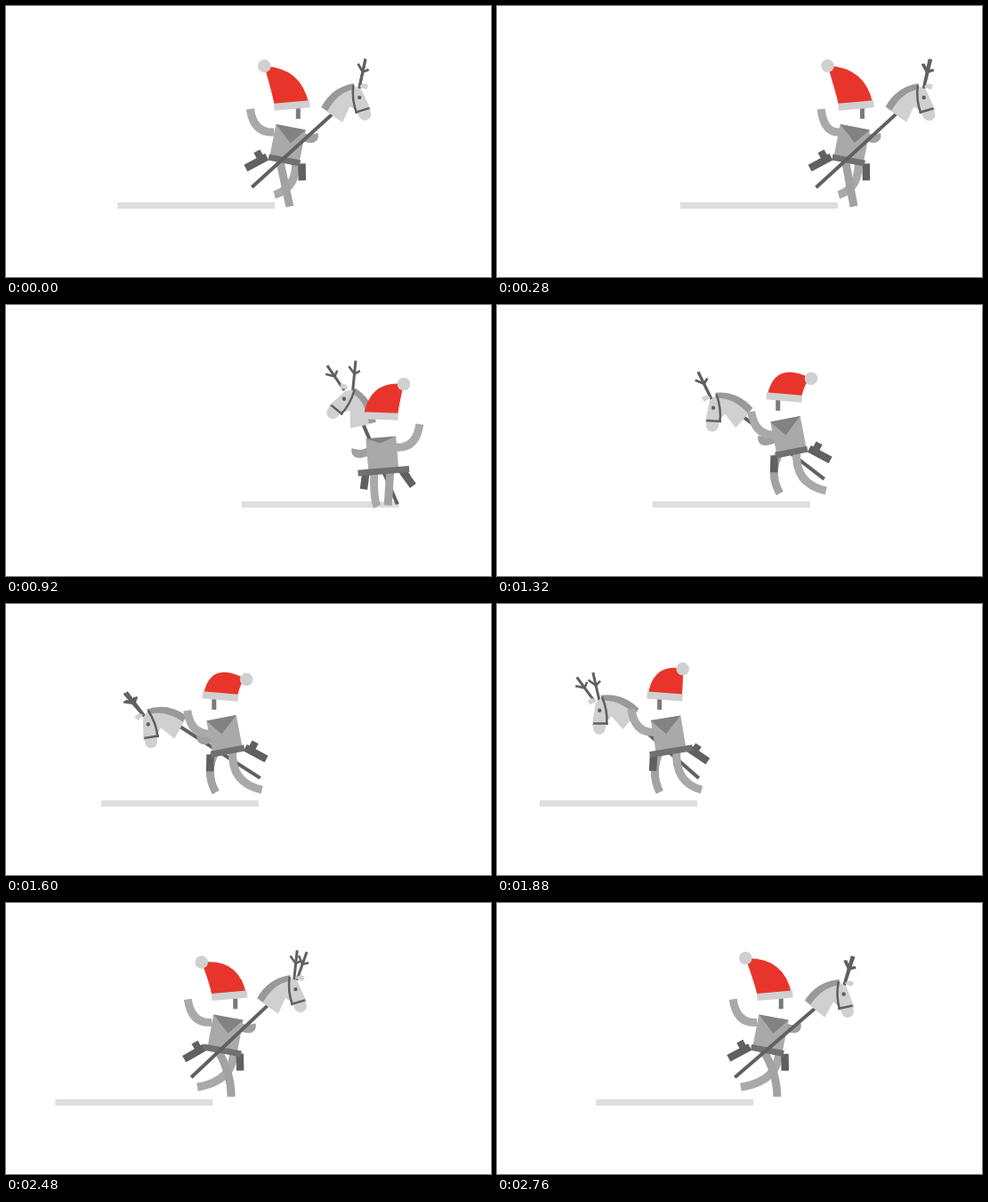
Animation of 545 by 305 pixels, one loop 2.8 s. Source, as an HTML page with a canvas:

```html
<!DOCTYPE html>
<html lang="en">
<head>
<meta charset="utf-8">
<title>Hobby horse ride</title>
<style>
html, body { margin: 0; width: 100%; height: 100%; overflow: hidden; background: #fff; }
canvas { display: block; }
</style>
</head>
<body>
<canvas id="stage" width="545" height="305"></canvas>
<script>
const ctx = document.getElementById('stage').getContext('2d');
const LOOP = 2800, HOP = 280, RAD = Math.PI / 180;
const BODY = '#a9a9a9', DARK = '#606060', SHADE = '#828282', LIGHT = '#d0d0d0', RED = '#e8352b';

// ms, ground left edge, rider's lead over it, heading, horse dip, hat tilt (degrees)
const keys = [
  [0, 125, 191, 0, 0, -35],
  [440, 250, 190, 12, 0, -30],
  [560, 276, 168, 60, -10, 6],
  [920, 265, 158, 115, -22, 36],
  [1320, 175, 153, 180, 14, 55],
  [1600, 107, 139, 185, 27, 57],
  [1900, 45, 146, 215, 15, 30],
  [2200, 22, 172, 285, -32, -43],
  [2460, 52, 190, 340, 0, -40],
  [2760, 111, 196, 357, 5, -38]];

const clamp = v => Math.max(-1, Math.min(1, v));

function keyAt(i) {
  const n = keys.length, turns = Math.floor(i / n), key = [...keys[i - turns * n]];
  key[0] += turns * LOOP;
  key[3] += turns * 360;
  return key;
}

// Smooth curve through the keys, repeating every loop
function sample(t) {
  let i = keys.length - 1;
  while (keys[i][0] > t) i--;
  const [a, b, c, d] = [-1, 0, 1, 2].map(k => keyAt(i + k));
  const span = c[0] - b[0], u = (t - b[0]) / span, v = 1 - u;
  return b.map((from, k) => {
    const slopeIn = (c[k] - a[k]) / (c[0] - a[0]), slopeOut = (d[k] - b[k]) / (d[0] - b[0]);
    return from * v * v * (1 + 2 * u) + c[k] * u * u * (3 - 2 * u)
      + span * u * v * (slopeIn * v - slopeOut * u);
  });
}

function at(x, y, degrees, paint) {
  ctx.save();
  ctx.translate(x, y);
  ctx.rotate(degrees * RAD);
  paint();
  ctx.restore();
}
function shape(d, color) { ctx.fillStyle = color; ctx.fill(new Path2D(d)); }
function stroke(d, width, color) {
  ctx.lineWidth = width;
  ctx.strokeStyle = color;
  ctx.stroke(new Path2D(d));
}
function limb(x, y, bendX, bendY, endX, endY, color) {
  stroke(`M${x} ${y}Q${bendX} ${bendY} ${endX} ${endY}`, 9, color);
}
function dot(x, y, r, color) {
  ctx.beginPath();
  ctx.arc(x, y, r, 0, 7);
  ctx.fillStyle = color;
  ctx.fill();
}

function drawHorse(face, away, dip) {
  const back = Math.max(away, 0), wide = Math.abs(away);
  const x = 50 * face, y = -34 + .9 * Math.abs(dip) - 22 * back;
  const flip = clamp(2.2 * face - away);
  const c = Math.cos(dip * RAD), s = Math.sin(dip * RAD);
  stroke(`M${x} ${y}L${-40 * face} ${48 + 8 * back}`, 4, DARK);
  for (const side of [-1, 1]) {
    const tilt = face * (12 + Math.abs(dip)) + side * 22 * wide;
    at(x + flip * 31 * (c + s) + side * 6 * wide, y + 31 * (s - c), tilt, () => {
      stroke('M0 2V-32', 3, DARK);
      stroke('M-7-25L0-17L6-21', 2.5, DARK);
    });
  }
  ctx.save();
  ctx.translate(x, y);
  ctx.scale(flip, 1);
  ctx.rotate(dip * RAD);
  shape('M-10-6Q2-24 23-33L33-28L44-5L30 2L28-4L20-9L12 9Z', LIGHT);
  shape('M31-31Q35-37 41-33L39-28Z', LIGHT);
  shape('M-12-8Q0-31 25-35L23-28Q6-24-5-4Z', '#999');
  dot(37, 0, 7, LIGHT);
  dot(31, -19, 2.2, DARK);
  stroke('M24-33Q22-16 28-1M26-2L42-7', 2.5, DARK);
  ctx.restore();
}

function drawHat(face, tilt, length) {
  const px = length * Math.sin(tilt * RAD), py = -length * Math.cos(tilt * RAD);
  at(5 * face, -44, 0, () => {
    const slant = 20 * Math.sin(5 * face * RAD), bulge = .2 * px;
    shape(`M${px} ${py}Q${bulge - 17} ${-30 - 2 * bulge}-19 ${slant}L19 ${-slant}
      Q${bulge + 17} ${-30 + 2 * bulge} ${px} ${py}Z`, RED);
    stroke(`M-20 ${slant}L20 ${-slant}`, 8, LIGHT);
    dot(px, py, 7.3, LIGHT);
  });
}

function drawLegs(face, side, phase, bodyY) {
  const swing = Math.cos(phase), spread = 10 * side * (1 - Math.abs(face));
  const backX = -face * (20 + 22 * swing) - spread;
  const backY = 217 - 10 * Math.cos(phase - 40 * RAD) - bodyY;
  limb(-9 * side, 16, -9 * side + 3 * face, backY - 8, backX, backY, BODY);
  const frontX = face * (4 + 6 * swing) + spread;
  const frontY = 220 - 9 * Math.cos(phase + 25 * RAD) - bodyY;
  const knee = (9 * side + frontX) / 2 + 14 * face * Math.max(0, swing);
  limb(9 * side, 16, knee, (16 + frontY) / 2, frontX, frontY, '#a2a2a2');
}

function drawTorso(face, away) {
  const waist = 18 + 12 * Math.abs(away);
  at(0, 0, 11 * face, () => {
    for (const k of [-1, 1]) {
      const trail = Math.max(0, -k * face);
      at(k * 20, 18, -k * (12 + 50 * trail) - 11 * face * trail, () => {
        stroke(`M0 0V${19 + 8 * trail}`, 8.5, DARK);
        stroke(`M${k * 11 * trail} 7H${-k * 3 * trail}`, 8, DARK);
      });
    }
    shape('M-17-20H17V20H-17Z', BODY);
    stroke(`M${-waist} 18H${waist}`, 7, '#707070');
    shape(`M-17-20H17L${3 * face} ${-2 - 13 * Math.max(away, 0)}Z`, SHADE);
  });
}

function draw(t) {
  const [, ground, lead, heading, dip, tilt] = sample(t);
  const face = Math.cos(heading * RAD), away = Math.sin(heading * RAD);
  const phase = 2 * Math.PI * (t - 1320) / HOP;
  const bodyY = 158 - 11 * Math.cos(phase - 25 * RAD);
  const side = clamp(4 * away - 1), grip = clamp(face - 1.2 * away);
  const drop = 12 * Math.max(0, -face);
  const horseBehind = heading > 30 && heading < 240;

  ctx.fillStyle = '#fff';
  ctx.fillRect(0, 0, 545, 305);
  ctx.fillStyle = '#dedede';
  ctx.fillRect(ground, 221, 177, 7);

  at(ground + lead, bodyY, 0, () => {
    if (horseBehind) drawHorse(face, away, dip);
    drawLegs(face, side, phase, bodyY);
    limb(14 * grip, drop - 10, 32 * grip, drop - 2, 30 * grip, drop - 12, '#a0a0a0');
    drawTorso(face, away);
    limb(15 * side, drop - 14, 38 * side, drop - 12, 42 * side, drop - 40, BODY);
    if (away < .4) stroke(`M${12 * face}-41v12`, 5, '#7a7a7a');
    drawHat(face, tilt, 45 + 10 * Math.cos(2 * Math.PI * (t - 200) / LOOP));
    if (!horseBehind) drawHorse(face, away, dip);
  });
}

function tick() {
  draw(performance.now() % LOOP);
  requestAnimationFrame(tick);
}
tick();
</script>
</body>
</html>
```
